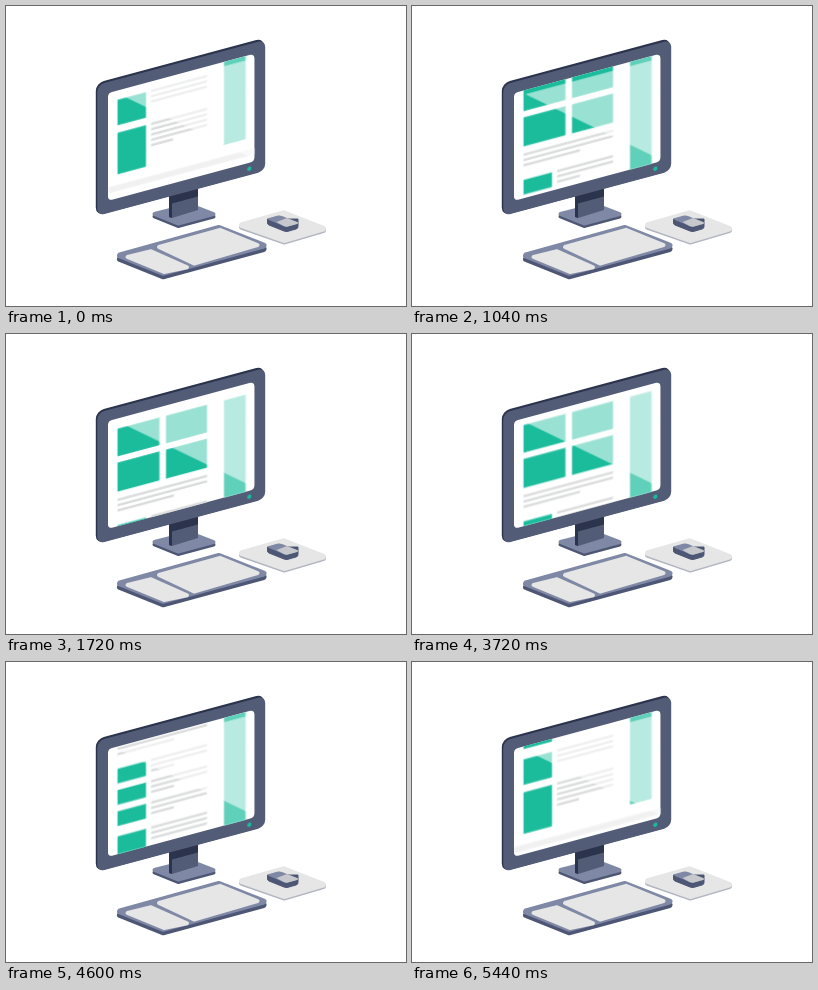
These frames come from a looping animation (400x300 px, 5.48 s). An HTML page:

```html
<!DOCTYPE html>
<html lang="en">
<head>
<meta charset="utf-8">
<title>Scrolling desktop</title>
<style>
  html, body { margin: 0; width: 100%; height: 100%; overflow: hidden; background: #fff; }
  svg { display: block; width: 400px; height: 300px; }
  .round { stroke-width: 6; stroke-linejoin: round; }
  .tight { stroke-width: 4; stroke-linejoin: round; }
  .teal { fill: #1abc9c; }
  .line { fill: #d9dada; }
  .band { fill: #f1f1f2; }
  .face { fill: #535c76; }
  .edge { fill: #2b344c; }
  .slab { fill: #7f89a6; stroke: #7f89a6; }
  .slab-edge { fill: #4d5674; stroke: #4d5674; }
  .key { fill: #e6e6e6; stroke: #e6e6e6; }
  .pad-edge { fill: #b2b6c0; stroke: #b2b6c0; }

  /* Each segment advances once every 40 ms. */
  #page { animation: scroll 5480ms -1ms infinite; }
  @keyframes scroll {
    0%       { transform: translateY(-165px); animation-timing-function: steps(17); }
    12.4088% { transform: translateY(17px);   animation-timing-function: steps(15); }
    23.3577% { transform: translateY(-40px);  animation-timing-function: steps(11); }
    31.3869% { transform: translateY(0);      animation-timing-function: linear; }
    67.1533% { transform: translateY(0);      animation-timing-function: steps(45); }
    100%     { transform: translateY(-165px); }
  }
</style>
</head>
<body>
<svg viewBox="0 0 400 300">
  <defs>
    <clipPath id="screen"><rect x="102" y="87" width="146.3" height="107.7" rx="4"/></clipPath>
  </defs>

  <!-- stand -->
  <g>
    <path class="slab-edge tight" d="M148.5 210.5L184 201.5L207.5 210.5L172 220Z"/>
    <path class="slab tight" d="M148.5 208L184 199L207.5 208L172 217.5Z"/>
    <path class="face" d="M163 186L192 180V204L166 212L163 211Z"/>
    <path class="edge" d="M163 186L192 180V190.5L166 197.5V212L163 211Z"/>
  </g>

  <!-- monitor -->
  <g transform="matrix(1 -.268 0 1 0 27.34)">
    <rect class="edge" x="89.8" y="73.8" width="168.5" height="132.7" rx="8"/>
    <rect class="face" x="91.3" y="76" width="167.9" height="131" rx="7"/>
    <rect x="102" y="87" width="146.3" height="107.7" rx="4" fill="#fff"/>
    <g clip-path="url(#screen)">
      <g id="page">
        <rect class="band" x="102" y="80" width="147" height="6"/>
        <rect class="band" x="102" y="346.5" width="147" height="6"/>
        <rect x="218" y="97.5" width="21.6" height="237.5" fill="#5fd0b9"/>
      </g>
      <path d="M102 91.3H249V193.2L113.4 91.3Z" fill="#fff" fill-opacity=".55"/>
    </g>
    <circle cx="243.3" cy="200.7" r="2.1" fill="#1abc9c"/>
  </g>

  <!-- keyboard -->
  <path class="slab-edge round" d="M114 253L213 225.5L257.5 243L157 270.3Z"/>
  <path class="slab round" d="M114 249.5L213 222L257.5 239.5L157 266.8Z"/>
  <path class="key tight" d="M121.5 251L145 245.3L181 261.3L158 266Z"/>
  <path class="key tight" d="M153 241L214 223.8L251.5 239L188 257.5Z"/>

  <!-- mouse and pad -->
  <path class="pad-edge round" d="M236 220.8L277.5 208.8L317 224.2L278 235.5Z"/>
  <path class="key round" d="M236 219.2L277.5 207.3L317 222.7L278 234Z"/>
  <path d="M261.5 213H292V220.5Q292 222.5 290 223L282 225.3Q280 225.8 278 225L263 219Q261.5 218.3 261.5 217Z" class="slab-edge" stroke="none"/>
  <path d="M263 214Q261 213 263 212L272 209.6Q274 209.2 276 210L291 216Q293 217 291 218L282 220.5Q280 221 278 220.2Z" fill="#7f89a6"/>
  <path d="M270.5 216L281 212L291 216Q293 217 291 218L282 220.5Q280 221 278 220.2Z" fill="#c6c8cb"/>
</svg>
<script>
  const page = document.getElementById('page');

  function box(kind, x, y, w, h) {
    const r = document.createElementNS('http://www.w3.org/2000/svg', 'rect');
    r.setAttribute('class', kind);
    Object.entries({ x, y, width: w, height: h }).forEach(([k, v]) => r.setAttribute(k, v));
    page.append(r);
  }

  function text(x, y, count, lastEnd) {
    for (let i = 0; i < count; i++) {
      const end = i === count - 1 ? lastEnd : 201;
      box('line', x, y + i * 5.3, end - x, 2.4);
    }
  }

  for (const [y, h] of [[97.3, 27.6], [131.2, 29]]) {
    box('teal', 111.5, y, 42, h);
    box('teal', 160, y, 41, h);
  }
  text(111.5, 167.3, 3, 168);

  // top, height, text lines, end of the last line
  const items = [
    [193.7, 14.7, 3, 168],
    [215, 14.7, 3, 168],
    [236.3, 14.7, 3, 168],
    [261.3, 25.5, 3, 201],
    [294.3, 41.5, 5, 167]
  ];
  for (const [y, h, count, end] of items) {
    box('teal', 111.5, y, 28.5, h);
    text(145, y - 1, count, end);
  }
</script>
</body>
</html>
```
